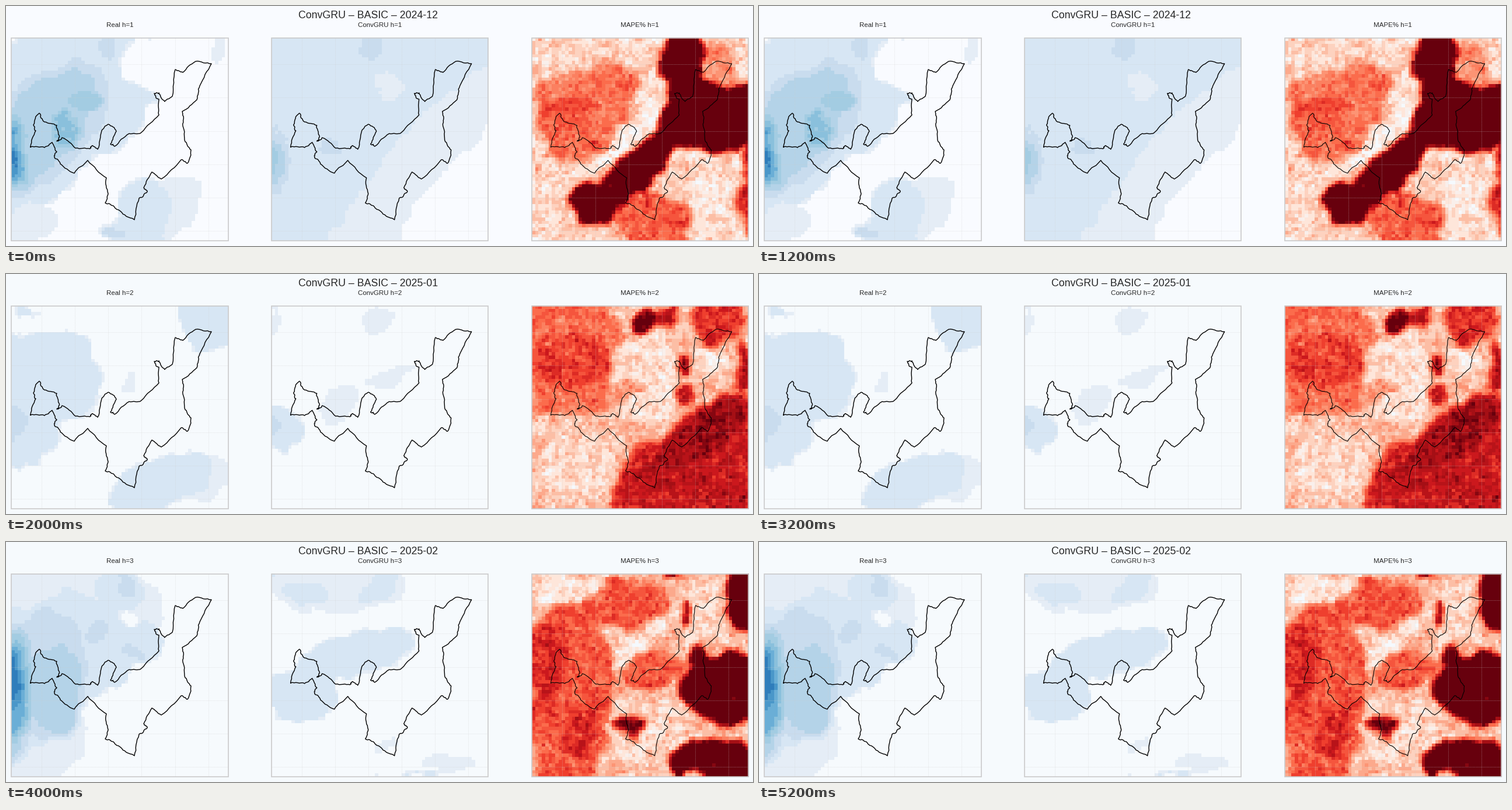
These frames come from a looping animation (1280 px wide and 412 px high, 6000 ms). A matplotlib script:

```python
import numpy as np
import matplotlib.pyplot as plt
from matplotlib.animation import FuncAnimation
from matplotlib.patches import Rectangle

W, H, DPI = 1280, 412, 64
PX = 72 / DPI                      # points per pixel
COLS, ROWS = 65, 61
LEFTS = (9.0, 454.7, 900.6)
TOP, PW, PH = 54.5, 371.5, 348.5

plt.rcParams["font.family"] = "Liberation Sans"

PAPER = ["#f9fbff", "#f6fafd", "#f6fafd"]
BLUES = ["#e5edf6", "#d7e6f4", "#c9dcee", "#b4d3e8", "#a3cce2", "#8ac0dc",
         "#6aaed6", "#4a97c9", "#2f7dbb", "#1a64aa", "#08468b"]
REDS = ["#f5f9fd", "#fee6da", "#fcbea5", "#fc9474", "#fb6c4c", "#ef3f2e",
        "#cb181d", "#a50f15", "#67000d"]

# Region border, clockwise from its western tip
NORTH = [(42, 242), (51, 214), (47, 204), (57, 184), (66, 199), (87, 205),
         (91, 222), (87, 232), (96, 226), (119, 244), (144, 245), (149, 240),
         (157, 246), (164, 214), (175, 203), (189, 215), (179, 237), (186, 241),
         (211, 219), (232, 217), (262, 187), (262, 160), (254, 150), (262, 149),
         (272, 164), (285, 155), (290, 109), (303, 114), (325, 95), (352, 99)]
SOUTH = [(332, 137), (327, 161), (302, 181), (303, 206), (307, 233), (317, 247),
         (311, 270), (300, 264), (266, 297), (250, 285), (236, 312), (242, 319),
         (228, 330), (220, 367), (206, 361), (185, 344), (170, 338), (175, 322),
         (172, 295), (140, 265), (117, 287), (93, 271), (83, 260), (87, 250),
         (79, 234), (66, 243), (42, 242)]

# Ellipses: value, centre x, centre y, radii, optional tilt in degrees
real_dec = [(2, 100, 150, 200, 130, -35), (2, 30, 250, 95, 100),
            (0, 245, 103, 53, 44), (1, 40, 375, 45, 35), (3, 168, 74, 17, 20),
            (3, 70, 205, 125, 75, -50), (4, 65, 205, 112, 58, -50),
            (5, 135, 160, 27, 16), (5.6, 98, 208, 22, 34),
            (1, 285, 340, 48, 50), (2, 230, 365, 70, 42, -70),
            (3, 192, 392, 30, 14), (1, 362, 80, 15, 24)]
real_jan = [(2, 70, 180, 95, 85), (2, 25, 260, 70, 72), (2, 30, 62, 30, 14),
            (2, 345, 85, 47, 46), (1, 320, 345, 70, 40),
            (2, 260, 360, 100, 43, -25), (1, 208, 188, 14, 16),
            (3, 9, 255, 22, 32)]
real_feb = [(1, 110, 130, 155, 125), (1, 40, 320, 100, 110),
            (2, 120, 180, 110, 92), (2, 215, 180, 50, 35, -20),
            (2, 195, 85, 45, 45), (2, 50, 290, 85, 65), (0, 217, 138, 18, 16),
            (3, 207, 77, 17, 20), (3, 150, 155, 20, 15), (3, 217, 193, 22, 14),
            (3, 75, 230, 62, 115), (4, 85, 255, 42, 80)]
model_dec = [(1, 760, 330, 330, 130, -50), (0, 815, 370, 230, 108, -52),
             (3, 627, 74, 19, 22), (3, 553, 245, 18, 16), (1, 655, 138, 20, 19)]
model_jan = [(1, 459, 75, 8, 24), (1, 637, 75, 30, 18, -40),
             (1, 658, 178, 42, 15, -20), (1, 570, 230, 40, 20, -50),
             (2, 465, 268, 44, 42), (3, 457, 272, 14, 20)]
model_feb = [(1, 560, 75, 130, 45), (2, 510, 88, 38, 18),
             (2, 640, 76, 35, 22, -40), (2, 600, 195, 110, 38, -15),
             (2, 505, 260, 65, 46), (1, 755, 375, 50, 14),
             (1, 655, 355, 24, 12), (2, 690, 400, 70, 6)]
error_dec = [(3.8, 985, 190, 90, 75), (3.8, 1035, 135, 45, 40),
             (4.5, 955, 195, 48, 45), (0.5, 1055, 240, 60, 18, -40),
             (0.5, 1110, 180, 18, 28), (4.4, 1113, 370, 62, 52),
             (0.8, 1205, 330, 34, 34), (6, 1268, 310, 16, 75),
             (9.4, 1065, 295, 120, 32, -45), (9.4, 1014, 343, 42, 36),
             (9.4, 1205, 190, 88, 62), (9.4, 1155, 95, 38, 75),
             (3.2, 1223, 100, 28, 34)]
error_jan = [(4, 975, 140, 95, 105), (5.2, 965, 150, 70, 48),
             (1.2, 1095, 180, 62, 82), (3.2, 1065, 200, 26, 18),
             (9, 1096, 78, 20, 23), (6.5, 1132, 70, 18, 20),
             (5.4, 1215, 80, 50, 34), (0.8, 1205, 145, 22, 26),
             (8, 1160, 150, 10, 14), (6.6, 1167, 205, 20, 16),
             (6.1, 1195, 348, 190, 105, -35), (7.2, 1195, 275, 95, 38, -35),
             (1.4, 970, 335, 70, 60), (6.5, 1264, 165, 10, 55)]
error_feb = [(4.5, 960, 260, 80, 165), (4.5, 1060, 105, 75, 42),
             (4.5, 1100, 215, 60, 35), (5.6, 922, 210, 38, 75),
             (5.6, 985, 330, 33, 45), (0.9, 960, 78, 65, 26),
             (0.9, 1080, 178, 75, 20, -45), (1.4, 1110, 330, 80, 68),
             (1.4, 1190, 125, 52, 45), (9.4, 1245, 250, 92, 60),
             (9.4, 1225, 375, 85, 38), (9.4, 1188, 205, 12, 32),
             (9.4, 1255, 90, 28, 60), (9, 1160, 62, 28, 7),
             (8.5, 1163, 120, 8, 22), (8.5, 1068, 318, 22, 11)]

REAL = [real_dec, real_jan, real_feb]
MODEL = [model_dec, model_jan, model_feb]
ERROR = [error_dec, error_jan, error_feb]
# Cones that rise towards the western edge
REAL_CONES = [(10, 5, 255, 60, 130), None, (12, 0, 250, 75, 160)]
MODEL_CONES = [(6, 448, 270, 60, 110), None, None]


def blur(a, sigma):
    k = np.exp(-0.5 * (np.arange(-4, 5) / sigma) ** 2)
    k /= k.sum()
    a = np.pad(a, 4, mode="edge")
    for axis in (0, 1):
        a = np.apply_along_axis(np.convolve, axis, a, k, "valid")
    return a


def reach(x, y, cx, cy, rx, ry, tilt=0):
    """Distance from an ellipse's centre, 1 on its outline."""
    c, s = np.cos(np.radians(tilt)), np.sin(np.radians(tilt))
    dx, dy = x - cx, y - cy
    return np.hypot((dx * c + dy * s) / rx, (dy * c - dx * s) / ry)


def field(left, base, shapes, cone, soft, grain, seed):
    """Paint ellipses with wavy outlines on the cell grid, then add noise."""
    rng = np.random.default_rng(seed)
    x, y = np.meshgrid(left + (np.arange(COLS) + 0.5) * PW / COLS,
                       TOP + (np.arange(ROWS) + 0.5) * PH / ROWS)
    x = x + 30 * blur(rng.normal(size=x.shape), 2)
    y = y + 30 * blur(rng.normal(size=x.shape), 2)
    a = np.full(x.shape, float(base))
    for value, *shape in shapes:
        a[reach(x, y, *shape) <= 1] = value
    if cone:
        a = np.maximum(a, cone[0] * (1 - reach(x, y, *cone[1:])))
    noise = rng.normal(size=a.shape)
    return blur(a, soft) + grain * (0.6 * noise + 1.2 * blur(noise, 1))


def rgb(names):
    return np.array([[int(n[i:i + 2], 16) for i in (1, 3, 5)] for n in names])


def paint(a, palette, steps=1):
    """Colour each cell, with `steps` shades between palette entries."""
    top = len(palette) - 1
    v = np.clip(np.round(a * steps) / steps, 0, top)
    return np.dstack([np.interp(v, np.arange(top + 1), palette[:, i])
                      for i in range(3)]).astype(np.uint8)


def roughen(points):
    """Split every edge and push its middle sideways a little."""
    rng = np.random.default_rng(4)
    p = np.array(points, float)
    for push in (2, 1.3, 0.8):
        d = np.diff(p, axis=0)
        side = d[:, ::-1] * [1, -1] / np.hypot(*d.T)[:, None]
        mid = (p[:-1] + p[1:]) / 2 + side * rng.uniform(-push, push, (len(d), 1))
        out = np.empty((len(p) + len(mid), 2))
        out[::2], out[1::2] = p, mid
        p = out
    return p


def make_step(k):
    blues = rgb([PAPER[k]] + BLUES)
    base = 2 if k == 0 else 0
    real = field(LEFTS[0], 0, REAL[k], REAL_CONES[k], 0.6, 0.13, k)
    model = field(LEFTS[1], base, MODEL[k], MODEL_CONES[k], 0.6, 0.14, 10 + k)
    error = field(LEFTS[2], 2 - 0.6 * (k == 0), ERROR[k], None, 0.8, 0.62, 20 + k)
    return paint(real, blues), paint(model, blues), paint(error, rgb(REDS), 2)


STEPS = [make_step(k) for k in range(3)]
MONTHS = ["2024-12", "2025-01", "2025-02"]
HEADS = ["Real", "ConvGRU", "MAPE%"]

fig = plt.figure(figsize=(W / DPI, H / DPI), dpi=DPI)
ax = fig.add_axes([0, 0, 1, 1])
ax.axis("off")
border = roughen(NORTH + SOUTH)
images, heads = [], []
for i, left in enumerate(LEFTS):
    shift = left - LEFTS[0]
    right, bottom = left + PW, TOP + PH
    images.append(ax.imshow(STEPS[0][i], extent=(left, right, bottom, TOP),
                            interpolation="nearest", aspect="auto", zorder=1))
    grid = dict(color="#cccccc", lw=0.6 * PX, ls=(0, (2.5, 1.5)),
                alpha=0.55, zorder=2)
    for n in range(6):
        gx, gy = 61 + 57.15 * n + shift, 100.3 + 57.15 * n
        ax.plot([gx, gx], [TOP, bottom], **grid)
        ax.plot([left, right], [gy, gy], **grid)
    ax.plot(border[:, 0] + shift, border[:, 1], color="black",
            lw=(1.1 if i == 2 else 1.4) * PX, zorder=3)
    ax.add_patch(Rectangle((left, TOP), PW, PH, fill=False, ec="#cccccc",
                           lw=1.7 * PX, zorder=4))
    heads.append(ax.text(left + PW / 2, 35.5, "", size=11.45 * PX,
                         color="#262626", ha="center", va="baseline"))
title = ax.text(620.3, 21, "", size=17.8 * PX, color="#262626",
                ha="center", va="baseline")
ax.set_xlim(0, W)
ax.set_ylim(H, 0)


def draw(k):
    fig.set_facecolor(PAPER[k])
    title.set_text(f"ConvGRU – BASIC – {MONTHS[k]}")
    for image, data, text, name in zip(images, STEPS[k], heads, HEADS):
        image.set_data(data)
        text.set_text(f"{name} h={k + 1}")
    return [*images, *heads, title]


anim = FuncAnimation(fig, draw, frames=3, interval=2000, repeat=True,
                     repeat_delay=0, blit=False)
plt.show()
```
